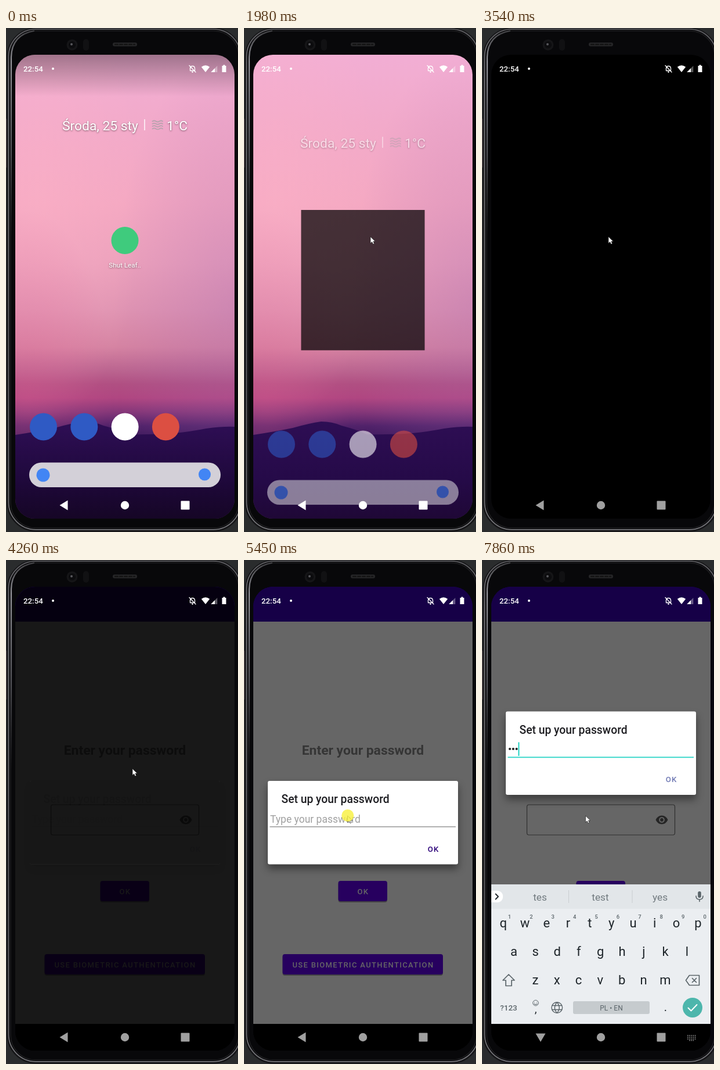
Animation, 400 px wide and 867 px high, one loop 8 s. Source, as an HTML page:

```html
<!DOCTYPE html>
<html lang="en">
<head>
<meta charset="utf-8">
<title>Phone</title>
<style>
html, body { margin: 0; width: 100%; height: 100%; overflow: hidden; background: #2a2c2d; }
svg { display: block; width: 100%; height: 100%; }
text { font-family: Roboto, sans-serif; white-space: pre; }
.mid { text-anchor: middle; }
.med { font-weight: 500; }
.line { fill: none; stroke-linecap: round; stroke-linejoin: round; }
#dialog { filter: drop-shadow(0 8px 7px rgba(0,0,0,.42)); }
#home text { filter: drop-shadow(0 1px 1.5px rgba(0,0,0,.5)); }
</style>
</head>
<body>
<svg id="stage" viewBox="0 0 400 867" preserveAspectRatio="none"></svg>
<script>
const LOOP = 8000;

const rect = (x, y, w, h, fill, more = '') =>
  `<rect x="${x}" y="${y}" width="${w}" height="${h}" fill="${fill}" ${more}/>`;
const disc = (x, y, r, fill, more = '') =>
  `<circle cx="${x}" cy="${y}" r="${r}" fill="${fill}" ${more}/>`;
const path = (d, fill, more = '') => `<path d="${d}" fill="${fill}" ${more}/>`;
const line = (d, color, w = 1.5, more = '') =>
  `<path class="line" d="${d}" stroke="${color}" stroke-width="${w}" ${more}/>`;
const label = (s, x, y, size, fill, cls = '', more = '') =>
  `<text x="${x}" y="${y}" font-size="${size}" fill="${fill}" class="${cls}" ${more}>${s}</text>`;
const group = (id, body, more = '') => `<g id="${id}" ${more}>${body}</g>`;
const stopList = stops => stops.map(([o, c, a = 1]) =>
  `<stop offset="${o}" stop-color="${c}" stop-opacity="${a}"/>`).join('');
const gradient = (id, stops) =>
  `<linearGradient id="${id}" x2="0" y2="1">${stopList(stops)}</linearGradient>`;
const glow = (id, x, y, r, color, alpha) =>
  `<radialGradient id="${id}" cx="${x}" cy="${y}" r="${r}">` +
  stopList([[0, color, alpha], [1, color, 0]]) + '</radialGradient>';

const defs = '<defs>' +
  gradient('sky', [[0, '#f2aed4], '.slice(0, 7)], [.15, '#f2aaca'], [.32, '#f4a8c2'], [.45, '#eca1bc'],
    [.55, '#e094b2'], [.63, '#d583a2'], [.68, '#bb6590'], [.71, '#b04f82'], [.74, '#b04681'],
    [.77, '#853779'], [.8, '#51226a'], [.82, '#431c60']]) +
  glow('warm', .1, .3, .5, '#ffb4c8', .4) + glow('cool', 1, .53, .55, '#a468b0', .32) +
  glow('ember', .05, .735, .4, '#d8588c', .35) +
  gradient('hill', [[0, '#2e0e54'], [.6, '#250a48'], [1, '#1f0836']]) +
  gradient('topShade', [[0, '#000', .34], [1, '#000', 0]]) +
  gradient('lowShade', [[0, '#000', 0], [1, '#000', .3]]) +
  gradient('rim', [[0, '#5c5c60'], [.1, '#808085'], [.35, '#78787c'], [.6, '#646468'], [1, '#77777b']]) +
  gradient('shine', [[0, '#5a5a5e', .7], [.15, '#98989e'], [.6, '#606066', .8], [1, '#404044', 0]]) +
  '<clipPath id="screen"><rect x="16" y="46" width="378" height="798" rx="34"/></clipPath></defs>';

const body =
  rect(0, 156, 2, 84, '#453d41') +
  rect(3.5, 1.5, 402, 863, '#08080a', 'rx="48" stroke="#151517" stroke-width="4"') +
  rect(4.5, 1.8, 400, 861, 'none', 'rx="47" stroke="url(#rim)" stroke-width="1.700"') +
  rect(8, 5, 393, 855, 'none', 'rx="43" stroke="#1e1e20" stroke-width="1.500"') +
  line('M9 360V50Q10 12 48 5', 'url(#shine)', 2.200) +
  disc(114, 29, 9.5, '#151517') + disc(114, 29, 6, '#0c0c0e') + disc(113, 28, 2, '#58585c') +
  rect(133, 19, 10, 20, '#111113', 'rx="5"') +
  rect(184, 25, 42, 6.5, '#252527', 'rx="3"') +
  line('M188 28.2H222', '#111', 2, 'stroke-dasharray="5 3"');

const wallpaper =
  ['sky', 'warm', 'cool', 'ember'].map(id => rect(16, 46, 378, 798, `url(#${id})`)).join('') +
  path('M16 700Q55 694 84 688Q112 680 133 677Q152 677 168 684Q195 691 212 699Q250 700 290 697' +
    'Q320 694 345 689Q375 685 394 686V844H16Z', 'url(#hill)');

const fog = [0, 1, 2, 3].map(i =>
  line(`M252.500 ${160.5 + i * 4.3}q3-2 6 0t6 0t5.500 0`, '#b9a2ae', 1.8)).join('');

const home =
  label('Środa, 25 sty', 97, 175.500, 22.8, '#fff') + rect(238.300, 157, 1.400, 19, '#fff') + fog +
  label('1°C', 277, 175.500, 22.8, '#fff') +
  group('app', disc(205, 365.500, 23.5, '#3fcb7d')) +
  group('appName', label('Shut Leaf..', 205, 412, 11.7, '#fff', 'mid')) +
  ['#2f5ac4', '#2f5ac4', '#fff', '#dc4f42'].map((c, i) => disc(64.5 + i * 70.300, 686, 23.5, c)).join('') +
  rect(40, 747.500, 330, 42.5, '#d3d0d8', 'rx="21"') +
  disc(64, 769, 11.5, '#4285f4') + disc(342.500, 768, 10.5, '#4285f4');

const status =
  label('22:54', 30, 75, 13.3, '#fff', 'med') + disc(81, 70, 2, '#fff') +
  line('M317.500 73.500H325.500V69Q325 65.500 321.500 65.500Q318 65.500 317.500 69ZM316 64.500L327 76', '#fff', 1.3) +
  disc(321.500, 75.800, 1.2, '#fff') +
  path('M336.800 67Q344 61.500 351.200 67L344 76Z', '#fff') +
  path('M364.300 65V76H353.300Z', '#fff', 'opacity=".35"') + path('M360 69.300V76H353.300Z', '#fff') +
  path('M372.500 65H374.500V63.500H377.500V65H379.500V76H372.500Z', '#fff');

const keyIcon = [0, 1, 2].map(r => `M354 ${818 + r * 3}h15`).join('');
const nav =
  group('back', path('M92.500 821L106.500 812.500V829.500Z', 'inherit')) +
  group('hide', path('M92.500 814.500H109.500L101 829Z', 'inherit') +
    `<path d="${keyIcon}M357 826.500h9" fill="none" stroke="#909090" stroke-width="1.700" stroke-dasharray="1.800 1.400"/>`) +
  '<circle cx="205" cy="821" r="7.200"/><rect x="301.500" y="813.500" width="15" height="15" rx="1"/>';

const eye = path('M299.500 447Q303 439.500 310 439.500T320.500 447Q317 454.500 310 454.500T299.500 447Z' +
    'M310 442.200a4.800 4.800 0 1 0 .01 0Z', '#5c5c5c', 'fill-rule="evenodd"') + disc(310, 447, 2.900, '#5c5c5c');
const button = (s, x, y, w) =>
  rect(x, y + 2, w, 35, '#aaa', 'rx="4"') + rect(x, y, w, 35, '#6200ee', 'rx="4"') +
  label(s, x + w / 2 + .7, y + 22.700, 13, '#fff', 'mid med', 'letter-spacing="1.35"');

const page =
  rect(16, 46, 378, 798, '#000') + rect(16, 106, 378, 692, '#fff') + rect(16, 46, 378, 60, '#3700b3') +
  label('Enter your password', 205, 335, 22.9, '#858585', 'mid', 'font-weight="700"') +
  rect(77.500, 421, 255, 52, 'none', 'rx="3.500" stroke="#777" stroke-width="1.200"') + eye +
  button('OK', 162.500, 552, 84.500) + button('USE BIOMETRIC AUTHENTICATION', 66.500, 678, 276.500) +
  rect(16, 46, 378, 798, '#000', 'opacity=".6"') +
  rect(16, 46, 378, 798, '#000', 'id="pageShade"');

// Laid out with its top edge at y = 0
const dialog =
  rect(41, 0, 328, 143.500, '#fff', 'rx="3"') +
  label('Set up your password', 64.500, 38, 19.3, '#1e1e22', 'med') +
  group('hint', label('Type your password', 45, 72, 17.5, '#a0a0a0')) +
  rect(44.500, 78, 320.500, 1.800, '#a8a8a8', 'id="underline"') +
  group('dots', [0, 1, 2].map(i => disc(48 + i * 5.800, 64.500, 2.1, '#222')).join('')) +
  rect(0, 53, 2, 23.500, '#22d3c2', 'id="caret"') +
  label('OK', 326.700, 121.700, 13.2, '#2a0078', 'mid med', 'id="ok" letter-spacing="1.300"') +
  rect(41, 0, 328, 143.500, '#000', 'rx="3" id="dialogShade"');

const ink = '#1d2429', grey = '#5b656a';
const row = (keys, x, y) => [...keys].map((k, i) => label(k, x + i * 37.300, y, 22, ink, 'mid')).join('');
const keyboard =
  rect(16, 558, 378, 240, '#ebeef1') + rect(16, 558, 378, 42, '#e2e6e9') +
  rect(16, 569, 20, 20, '#fff', 'rx="9"') + rect(16, 569, 10, 20, '#fff') +
  line('M23.500 574.500l4.500 4.500l-4.500 4.500', ink, 1.8) +
  [100, 204, 307].map((x, i) => label('', x, 586, 17.3, '#717a7f', 'mid', `id="word${i}"`)).join('') +
  rect(149, 568, 1, 22, '#c9ced1') + rect(258.500, 568, 1, 22, '#c9ced1') +
  rect(372.200, 570, 5.600, 11, grey, 'rx="2.800"') + line('M369 578q0 6 6 6t6-6M375 584v3.500', grey, 1.600) +
  row('qwertyuiop', 36.700, 632) +
  [...'1234567890'].map((k, i) => label(k, 47.500 + i * 37.400, 617, 9.5, grey, 'mid med')).join('') +
  row('asdfghjkl', 55, 681) + row('zxcvbnm', 92, 730) +
  line('M46 713l10 10h-5v9.500h-10v-9.500h-5Z', grey, 1.700) +
  line('M351.500 723l6-8.500h17v17h-17ZM362.500 719.500l7 7M369.500 719.500l-7 7', grey, 1.700) +
  label('?123', 46, 775, 13.5, grey, 'mid med') +
  disc(92.500, 762, 4.800, 'none', `stroke="${grey}"`) +
  line('M90.500 760.500v.2M94.500 760.500v.2M90 763.500q2.500 2.500 5 0', grey, 1.1) +
  label(',', 92.500, 779, 19, ink, 'mid') +
  line('M120 770a9.300 9.300 0 1 0 18.600 0a9.300 9.300 0 1 0-18.600 0M121 766.500h16.600M121 773.500h16.600' +
    'M129.300 760.700q-8 9.300 0 18.600q8-9.300 0-18.600', grey, 1.400) +
  rect(157, 759, 132, 22, '#c6cbce', 'rx="3"') + label('PL • EN', 223, 774.500, 12, grey, 'mid') +
  label('.', 316.500, 776, 20, ink, 'mid') +
  disc(363, 770, 17, '#4db6ac') + line('M355.500 770.500l5 5l10-10.500', '#fff', 2);

const stage = document.getElementById('stage');
stage.innerHTML = defs + body +
  group('display',
    group('launcher', wallpaper +
      group('scrim', rect(16, 46, 378, 72, 'url(#topShade)') + rect(16, 690, 378, 154, 'url(#lowShade)')) +
      group('home', home)) +
    rect(0, 0, 0, 0, '#000', 'id="window"') +
    group('page', page) + group('nav', nav) + group('dialog', dialog) + group('keyboard', keyboard) +
    status, 'clip-path="url(#screen)"') +
  group('pointer', path('M0 0V11.300L2.700 8.900L4.500 12.800L6.600 11.900L4.900 8.100H8.300Z', '#fff',
    'stroke="#222" stroke-width=".7"')) +
  disc(0, 0, 10.500, '#f7f03c', 'id="tap" opacity=".8"');

const el = {};
stage.querySelectorAll('[id]').forEach(n => el[n.id] = n);
const set = (id, attrs) => { for (const k in attrs) el[id].setAttribute(k, attrs[k]); };
const show = (id, on) => set(id, { visibility: on ? 'inherit' : 'hidden' });
const span = (t, a, b) => Math.min(1, Math.max(0, (t - a) / (b - a)));
const out = (p, n) => 1 - (1 - p) ** n;
const mix = (a, b, p) => a + (b - a) * p;
const within = (t, a, b) => t >= a && t < b;

function words(t) {
  if (t < 7610) return ['thanks', 'I', 'we'];
  if (t < 7700) return ['to', 'the', 'thanks'];
  if (t < 7780) return ['te', 'test', 'ten'];
  return ['tes', 'test', 'yes'];
}

function launch(t) {
  const p = span(t, 1895, 2310), started = t >= 1910;
  const w = mix(47, 378, out(p, 3)), h = mix(47, 798, out(p, 1.29));
  const cy = mix(365.5, 445, out(p, 8.4));
  show('launcher', t < 2320);
  show('scrim', !started);
  show('app', !started);
  show('appName', !started);
  set('home', {
    transform: `translate(0 ${started ? 60 * out(p, 3) : 0})`,
    opacity: started ? 1 - span(t, 1895, 2105) : 1
  });
  const s = 1 + .07 * span(t, 1640, 1740);
  set('app', {
    transform: `translate(205 365.5) scale(${s}) translate(-205 -365.5)`,
    opacity: t < 1500 ? 1 : .95
  });
  show('window', started);
  set('window', { x: 205 - w / 2, y: cy - h / 2, width: w, height: h, opacity: span(t, 1895, 2015) });
}

function form(t) {
  const open = t >= 4260;
  show('page', open);
  set('pageShade', { opacity: 1 - span(t, 4238, 4338) });
  show('dialog', open);
  const y = mix(380, 260.5, out(span(t, 6070, 6330), 3));
  set('dialog', { transform: `translate(0 ${y})`, opacity: span(t, 4250, 4326) });
  set('dialogShade', { opacity: 1 - span(t, 4250, 4410) });

  const focused = t >= 5540;
  set('underline', { fill: focused ? '#2bd4c5' : '#a8a8a8' });
  set('ok', { fill: t < 6080 ? '#2a0078' : '#7079b4' });
  const typed = t < 7610 ? 0 : t < 7700 ? 1 : t < 7780 ? 2 : 3;
  show('hint', !typed);
  [...el.dots.children].forEach((d, i) => d.setAttribute('visibility', i < typed ? 'inherit' : 'hidden'));
  show('caret', within(t, 5570, 6080) || within(t, 6540, 7020) || t >= 7530);
  set('caret', { x: typed ? 45 + typed * 5.8 : 45 });
}

function keys(t) {
  const p = span(t, 6180, 6380);
  show('keyboard', p > 0);
  set('keyboard', { transform: `translate(0 ${75 * (1 - out(p, 2))})`, opacity: out(p, 2.5) });
  words(t).forEach((w, i) => el['word' + i].textContent = w);

  const g = Math.round(mix(255, 160, span(t, 2450, 2590)));
  set('nav', { fill: `rgb(${g},${g},${g})` });
  show('back', t < 5810);
  show('hide', t >= 5810);
}

function pointer(t) {
  const a = out(span(t, 480, 940), 2);
  const q = span(t, 4820, 5030), b = q * q * (3 - 2 * q);
  const x = mix(mix(398, 218, a), 178.5, b), y = mix(mix(537, 359, a), 440, b);
  show('pointer', t >= 500);
  set('pointer', { transform: `translate(${x} ${y})` });
  show('tap', within(t, 1260, 1330) || within(t, 5450, 5540));
  set('tap', { cx: x + .3, cy: y - .5 });
}

function draw(t) {
  launch(t);
  form(t);
  keys(t);
  pointer(t);
}

const start = performance.now();
function tick() {
  draw((performance.now() - start) % LOOP);
  requestAnimationFrame(tick);
}
tick();
</script>
</body>
</html>
```
